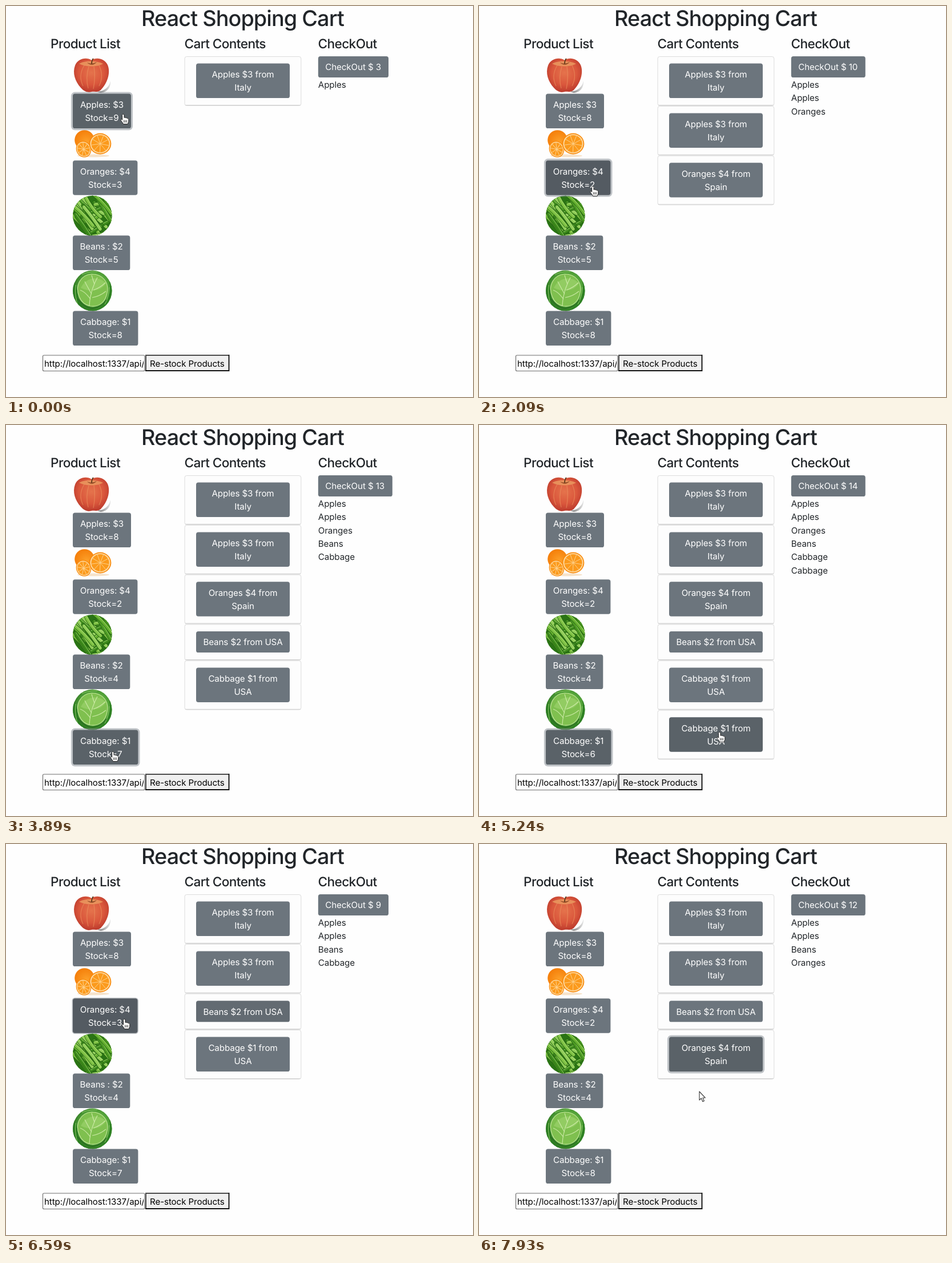
Write an HTML page that moves like this. It is 818x684 px and loops after 8 s.

```html
<!DOCTYPE html>
<html lang="en">
<head>
<meta charset="utf-8">
<title>React Shopping Cart</title>
<style>
  html, body { margin: 0; width: 100%; height: 100%; overflow: hidden; background: #fefefe; }
  svg { display: block; width: 818px; height: 684px; }
  text {
    font-family: Inter, "Liberation Sans", sans-serif; font-size: 15.1px; letter-spacing: -.005em;
    font-optical-sizing: none; font-feature-settings: "calt" 0; fill: #212529;
    text-rendering: geometricPrecision; white-space: pre;
  }
  .h1 { font-size: 37.75px; font-weight: 500; letter-spacing: -.024em; text-anchor: middle; }
  .h4 { font-size: 22.6px; font-weight: 500; letter-spacing: -.026em; }
  .btn { fill: #fff; text-anchor: middle; }
  .left { fill: #fff; }
  .form { fill: #000; }
</style>
</head>
<body>
<svg viewBox="0 0 818 684">
  <defs>
    <radialGradient id="skin" cx=".5" cy=".42" r=".6">
      <stop offset="0" stop-color="#e5734c"/><stop offset=".6" stop-color="#da573c"/><stop offset="1" stop-color="#b9382b"/>
    </radialGradient>
    <radialGradient id="peel" cx=".6" cy=".6" r=".65">
      <stop offset="0" stop-color="#fda12a"/><stop offset="1" stop-color="#f47d08"/>
    </radialGradient>
    <radialGradient id="leaf" cx=".55" cy=".45" r=".6">
      <stop offset="0" stop-color="#8ecb5e"/><stop offset=".6" stop-color="#55a53a"/><stop offset="1" stop-color="#23691d"/>
    </radialGradient>
    <linearGradient id="shade">
      <stop offset="0" stop-color="#777"/><stop offset="1" stop-color="#e4e4e4"/>
    </linearGradient>
    <clipPath id="beanClip"><ellipse cx="151.3" cy="366.8" rx="34.2" ry="35"/></clipPath>
    <clipPath id="cabbageClip"><ellipse cx="151.3" cy="498" rx="34.2" ry="35.4"/></clipPath>
    <clipPath id="urlClip"><rect x="66" y="612" width="175" height="26"/></clipPath>
  </defs>

  <text class="h1" x="414.5" y="35.3">React Shopping Cart</text>
  <text class="h4" x="78" y="74.3">Product List</text>
  <text class="h4" x="312.5" y="74.3">Cart Contents</text>
  <text class="h4" x="546.5" y="74.3">CheckOut</text>

  <g id="apple">
    <path d="M160 150C172 149 181 142 183 131C184 142 178 151 166 152Z" fill="url(#shade)"/>
    <path d="M150 95C157 89 172 91 178 103C184 117 177 136 166 147C160 152 154 149 150 150C144 152 137 150 131 143C121 132 116 117 121 104C126 91 142 89 150 95Z" fill="url(#skin)"/>
    <path d="M128 101C138 95 158 95 170 101C160 107 140 107 128 101Z" fill="#eda264" opacity=".75"/>
    <g fill="none" stroke="#f0a068" stroke-width="1.3" opacity=".5">
      <path d="M137 104Q126 122 135 140M145 106Q139 125 144 144M154 106Q157 125 153 145M163 104Q172 122 163 140"/>
    </g>
    <path d="M142 99Q150 103 159 98Q151 107 142 99Z" fill="#8f4a24"/>
    <path d="M150 101Q150 95 153 92" fill="none" stroke="#5f3a1c" stroke-width="1.8"/>
  </g>

  <g id="oranges"></g>
  <g id="beans" clip-path="url(#beanClip)"></g>
  <g id="cabbage" clip-path="url(#cabbageClip)">
    <rect x="116" y="461" width="71" height="74" fill="url(#leaf)"/>
    <path d="M116 480Q128 494 126 514Q134 528 150 534H116Z" fill="#2c7d22"/>
    <path d="M176 463Q188 490 176 516Q166 530 150 534H187V463Z" fill="#2f8224"/>
    <path d="M128 508C120 488 132 470 150 469C170 469 181 484 177 502C174 519 162 527 148 525C138 523 131 516 128 508Z" fill="#7fc04f" stroke="#c2e598" stroke-width="1.2"/>
    <path d="M131 493C139 476 160 470 175 485C168 496 152 503 131 493Z" fill="#9bd26c" opacity=".7"/>
    <g fill="none" stroke="#d4eeb0" stroke-width="1.2" opacity=".85">
      <path d="M146 524Q147 500 160 475M148 513Q139 500 130 497M150 504Q142 490 138 482M151 510Q164 508 175 499M153 497Q165 493 174 484M155 487Q152 478 150 471"/>
      <path d="M126 524Q120 508 122 488M173 522Q181 508 181 492M133 470Q144 464 160 465" stroke="#8cc866"/>
    </g>
    <path d="M126 512Q136 528 152 529Q168 527 176 514" fill="none" stroke="#1f611b" stroke-width="1.8" opacity=".7"/>
  </g>

  <rect x="64.5" y="611" width="178.5" height="27.5" rx="2" fill="#fff" stroke="#6e6e6e" stroke-width="1.2"/>
  <g clip-path="url(#urlClip)"><text class="form" x="67" y="630.6">http://localhost:1337/api/</text></g>
  <rect x="244" y="610" width="147.5" height="29" fill="#efefef"/>
  <path d="M245 639V611H391" fill="none" stroke="#4c4c4c" stroke-width="1.9"/>
  <path d="M244 638H390.5V610" fill="none" stroke="#111" stroke-width="1.9"/>
  <text class="form" x="252" y="630.6">Re-stock Products</text>

  <g id="live"></g>
  <g id="cursor" stroke-linejoin="round" stroke-linecap="round">
    <g id="hand" fill="#fff" stroke="#222" stroke-width="1">
      <path d="M-1.5 1C-1.5-1.4 2-1.4 2 1V5.5C2.5 4.6 4.6 4.8 4.8 6C5.5 5.2 7.2 5.6 7.4 6.8C8.2 6.2 9.8 6.8 9.8 8.3V11C9.8 13.5 8.5 14.5 8.2 16.5H.4C0 14.5-2.4 12.5-4 9.6C-4.6 8-2.6 7.4-1.5 9Z"/>
      <path d="M1.7 10V13.5M4 10V13.5M6.3 10V13.5" fill="none" stroke-width=".9"/>
    </g>
    <path id="arrow" d="M0 0V15L3.4 11.8L5.8 17.6L8.4 16.5L6 11H10.3Z" fill="#fff" stroke="#444" stroke-width="1.2"/>
  </g>
</svg>
<script>
const LOOP = 8000, START = 1043, TICK = 149.57, LINE = 23.4;
const GREY = '#6c757d', HOVER = '#5a6268', ACTIVE = '#545b62', FADING = '#636b72';
const $ = id => document.getElementById(id);

const products = [
  { name: 'Apples', label: 'Apples: $3', price: 3, from: 'Italy', y: 153.6, w: 102 },
  { name: 'Oranges', label: 'Oranges: $4', price: 4, from: 'Spain', y: 270.2, w: 113.4 },
  { name: 'Beans', label: 'Beans : $2', price: 2, from: 'USA', y: 401.6, w: 100.3 },
  { name: 'Cabbage', label: 'Cabbage: $1', price: 1, from: 'USA', y: 533.6, w: 114.4 }
];

// Clicks: tick of the press, button (P = product, C = cart row), ticks until it takes effect
const clicks = [
  [0, 'P0', 1], [6, 'P1', 1], [12, 'P2', 1], [17, 'P3', 1], [22, 'P3', 1],
  [29, 'C5', 1], [34, 'C2', 1], [37, 'P1', 2], [42, 'C3', 1]
];

// Pointer moves: first tick, last tick, end point
const moves = [
  [1, 4, 199, 316], [8, 10, 198, 415], [13, 16, 187, 572], [23, 28, 421, 538],
  [30, 33, 425, 300], [35, 37, 207, 307], [39, 42, 388, 368], [43, 46, 386, 433]
];

function pointer(k) {
  let x = 205, y = 190;
  for (const [a, b, tx, ty] of moves) {
    if (k <= a) break;
    const u = Math.min(1, (k - a) / (b - a)), e = u * u * (3 - 2 * u);
    x += (tx - x) * e;
    y += (ty - y) * e;
  }
  return { x, y };
}

function shop(k) {
  const s = { stock: [9, 3, 5, 8], cart: [0], focus: 'P0', last: '', grow: 1, pressed: false };
  for (const [at, id, delay] of clicks) {
    if (k < at) break;
    s.last = s.focus;
    s.focus = id;
    s.grow = Math.min(1, (k - at + 1) / delay);
    s.pressed = k <= at + delay;
    if (k < at + delay) continue;
    const i = +id[1];
    if (id[0] === 'P') {
      s.stock[i]--;
      s.cart.push(i);
    } else {
      s.stock[s.cart.splice(i, 1)[0]]++;
    }
  }
  return s;
}

const text = (str, x, y, cls = '') => `<text class="${cls}" x="${x}" y="${y}">${str}</text>`;
const box = (x, y, w, h, r, attrs) =>
  `<rect x="${x}" y="${y}" width="${w}" height="${h}" rx="${r}" ${attrs}/>`;

function button(b, s, over) {
  const focused = b.id === s.focus;
  let fill = focused || over ? HOVER : GREY, out = '';
  if (focused && over && s.pressed) fill = ACTIVE;
  if (b.id === s.last && s.grow < 1) fill = FADING;
  if (focused) {
    const r = 3.1 * s.grow;
    out += box(b.x - r, b.y - r, b.w + 2 * r, b.h + 2 * r, 3.9 + r, 'fill="#828a91" fill-opacity=".5"');
  }
  out += box(b.x, b.y, b.w, b.h, 3.9, `fill="${fill}"`);
  b.lines.forEach((l, i) => out += text(l, b.x + b.w / 2, b.y + 24.4 + i * LINE, 'btn'));
  return out;
}

function draw(k) {
  const s = shop(k), p = pointer(k), buttons = [];
  let out = '', y = 88;
  const add = (id, x, y, w, lines) =>
    buttons.push({ id, x, y, w, lines, h: 13.7 + lines.length * LINE });

  products.forEach((q, i) => add('P' + i, 117, q.y, q.w, [q.label, 'Stock=' + s.stock[i]]));
  s.cart.forEach((n, i) => {
    const q = products[n], full = `${q.name} $${q.price} from`;
    const lines = q.name === 'Beans' ? [full + ' ' + q.from] : [full, q.from];
    const h = 40 + lines.length * LINE;
    out += box(313, y + .5, 203.8, h - 1, 3.5, 'fill="#fdfdfd" stroke="#dcdcdc"');
    out += `<path d="M314 ${y + h - 1.3}H516" stroke="#cdcdcd"/>`;
    add('C' + i, 333, y + 12.6, 164, lines);
    y += h;
  });

  const total = s.cart.reduce((sum, n) => sum + products[n].price, 0);
  out += box(546.8, 88, total > 9 ? 130 : 123.2, 37.1, 3.9, `fill="${GREY}"`);
  out += text('CheckOut $ ' + total, 559.3, 112.4, 'left');
  s.cart.forEach((n, i) => out += text(products[n].name, 546.8, 142.7 + i * LINE));

  const hit = b => p.x >= b.x && p.x <= b.x + b.w && p.y >= b.y && p.y <= b.y + b.h;
  for (const b of buttons) out += button(b, s, hit(b));
  $('live').innerHTML = out;

  const over = buttons.some(hit);
  $('hand').style.display = over ? '' : 'none';
  $('arrow').style.display = over ? 'none' : '';
  $('cursor').setAttribute('transform', `translate(${p.x} ${p.y})`);
}

function slice(cx, cy, rx, ry, turn) {
  const ring = (f, fill) => `<ellipse rx="${rx * f}" ry="${ry * f}" fill="${fill}"/>`;
  let spokes = '';
  for (let i = 0; i < 9; i++) {
    const a = i * Math.PI * 2 / 9 + .2;
    spokes += `M0 0L${rx * .8 * Math.cos(a)} ${ry * .8 * Math.sin(a)}`;
  }
  return `<g transform="translate(${cx} ${cy}) rotate(${turn})">` +
    ring(1, '#f98a0a') + ring(.91, '#fed9a0') + ring(.81, '#fb9a1c') +
    `<path d="${spokes}" stroke="#fed08a" stroke-width="1"/></g>`;
}

function beans() {
  let seed = 11;
  const rnd = () => (seed = seed * 16807 % 2147483647) / 2147483647;
  const greens = ['#4b9a22', '#65b02f', '#7fc244', '#3c8a1b', '#90cd58'];
  let out = '<rect x="116" y="331" width="71" height="72" fill="#2a7414"/>';
  for (let i = 0; i < 30; i++) {
    const x = 118 + rnd() * 66, y = 334 + rnd() * 66;
    const a = (rnd() < .7 ? 35 : -40) + rnd() * 24, bend = rnd() * 14 - 7;
    const d = `M-24 0Q0 ${bend} 24 0`, c = greens[i % 5];
    out += `<g transform="translate(${x} ${y}) rotate(${a})" fill="none" stroke-linecap="round">` +
      `<path d="${d}" stroke="#236311" stroke-width="7"/><path d="${d}" stroke="${c}" stroke-width="5.4"/>` +
      `<path d="${d}" stroke="#b5e184" stroke-width="1" opacity=".6" transform="translate(0 -1.2)"/></g>`;
  }
  return out;
}

$('oranges').innerHTML =
  '<ellipse cx="153" cy="262" rx="28" ry="2.5" fill="#f6e3cb"/>' +
  '<circle cx="137.5" cy="234.5" r="17.3" fill="url(#peel)"/>' +
  slice(136, 250.5, 13, 14.5, -25) + slice(165, 241, 19.3, 18.5, 0);
$('beans').innerHTML = beans();

let shown = null;
function frame(now) {
  const k = Math.max(-1, Math.floor((now % LOOP - START) / TICK));
  if (k !== shown) draw(shown = k);
  requestAnimationFrame(frame);
}
draw(shown = -1);
requestAnimationFrame(frame);
</script>
</body>
</html>
```
